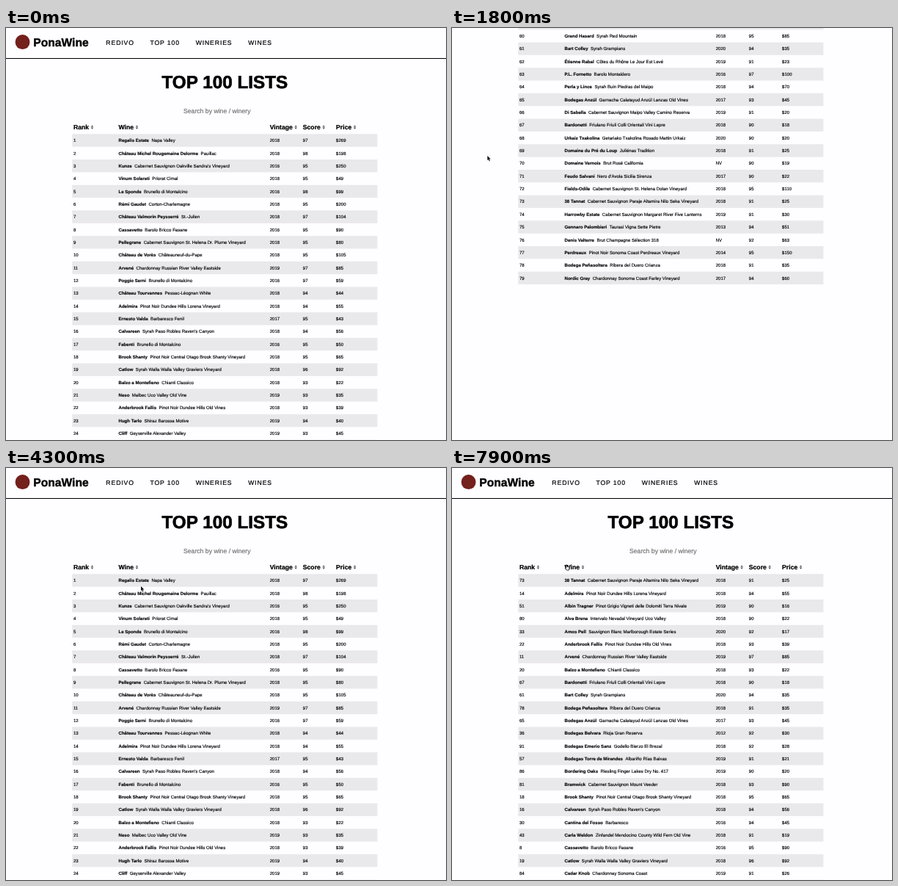
An HTML page with a canvas that plays this animation: 600x561 px, repeating every 8 s.

```html
<!DOCTYPE html>
<html lang="en">
<head>
<meta charset="utf-8">
<title>Top 100 lists</title>
<style>
html, body { margin: 0; width: 100%; height: 100%; overflow: hidden; background: #fefdff; }
canvas { display: block; }
</style>
</head>
<body>
<canvas id="stage" width="600" height="561"></canvas>
<script>
// One wine per line in rank order: winery|wine|vintage|score|price
const wines = `Regalis Estate|Napa Valley|2018|97|269
Château Michel Rougemaine Delorme|Pauillac|2018|98|198
Kunze|Cabernet Sauvignon Oakville Sandra's Vineyard|2016|95|250
Vinum Solarati|Priorat Cimal|2018|95|49
Le Sponde|Brunello di Montalcino|2016|98|99
Rémi Gaudet|Corton-Charlemagne|2018|95|200
Château Valmorin Peysserré|St.-Julien|2018|97|104
Cassavetto|Barolo Bricco Fasane|2016|95|90
Pellegrane|Cabernet Sauvignon St. Helena Dr. Plume Vineyard|2018|95|80
Château de Vorès|Châteauneuf-du-Pape|2018|95|105
Arvené|Chardonnay Russian River Valley Eastside|2019|97|85
Poggio Serni|Brunello di Montalcino|2016|97|59
Château Tourvannes|Pessac-Léognan White|2018|94|44
Adelmira|Pinot Noir Dundee Hills Lorena Vineyard|2018|94|55
Ernesto Valda|Barbaresco Fenil|2017|95|43
Calvareen|Syrah Paso Robles Raven's Canyon|2018|94|56
Fabenti|Brunello di Montalcino|2016|95|50
Brook Shanty|Pinot Noir Central Otago Brook Shanty Vineyard|2018|95|65
Catlow|Syrah Walla Walla Valley Graviers Vineyard|2018|96|92
Balzo a Montefieno|Chianti Classico|2018|93|22
Neso|Malbec Uco Valley Old Vine|2019|93|35
Anderbrook Fallis|Pinot Noir Dundee Hills Old Vines|2018|93|39
Hugh Tarlo|Shiraz Barossa Motive|2019|94|40
Cliff|Geyserville Alexander Valley|2019|93|45
Hoffrath|Riesling Trocken Rheinhessen Westhofener|2019|94|36
Faldetto|Vino Nobile di Montepulciano Riserva|2016|94|36
Morning Tide|Chardonnay Eola-Amity Hills Nine Hollows|2018|93|35
Tenuta Granvello|Bolgheri Rosso|2018|93|32
Domaine Perrolet|Chablis Premier Cru|2018|93|42
Cantina del Fosso|Barbaresco|2016|94|45
Orrin Vale|Pinot Noir Anderson Valley|2018|93|48
Weingut Stollner|Grüner Veltliner Wachau|2019|92|28
Amos Pell|Sauvignon Blanc Marlborough Estate Series|2020|92|17
Quinta da Loureda|Douro Reserva|2017|93|30
Harlan Pike|Zinfandel Dry Creek Valley|2018|92|34
Bodegas Belvara|Rioja Gran Reserva|2012|92|30
Mas Vernet|Bandol Rouge|2017|92|38
Stonelark|Merlot Columbia Valley|2018|92|26
Fattoria Lucenna|Chianti Classico Riserva|2017|92|29
Domaine Aubrelle|Sancerre|2019|91|27
Viña Tesoral|Carmenère Colchagua Valley|2018|91|20
Kettle Ford|Chardonnay Santa Lucia Highlands|2018|92|36
Carla Weldon|Zinfandel Mendocino County Wild Fern Old Vine|2018|91|19
Tenute Riva & Falco|Cannonau di Sardegna Riserva|2018|90|18
Quinta do Serol|Vintage Port|2018|97|100
Rocca di Valdestrina|Chianti Classico San Bertolino Gran Selezione|2016|95|75
Farquell|Cabernet Sauvignon Oakville|2018|98|185
Domaine de Morlaine|Bouzeron|2018|92|42
Pennerlough|Shiraz McLaren Vale Fields Road|2018|95|75
Schloss Wendelberg|Riesling Kamptal Schlosskellerei|2019|91|19
Albin Tragner|Pinot Grigio Vigneti delle Dolomiti Terra Nivale|2019|90|16
Rainsby|Cabernet Sauvignon Napa Valley Cousins Vineyard|2018|95|90
Clos de los Robles|Uco Valley|2018|90|20
Schloss Diemel|Riesling Kabinett Mosel Halder|2019|95|31
Fabrice Monnal|Vin de Savoie|2020|90|14
Guardesi|Amarone della Valpolicella Creta 150|2017|93|60
Bodegas Torre de Mirandes|Albariño Rías Baixas|2019|91|21
Tamanoss|Chardonnay Willamette Valley Inox Unoaked|2020|91|20
Colle del Brè|Custoza Superiore Cà del Lupo|2019|90|22
Grand Hasard|Syrah Red Mountain|2018|95|85
Bart Colley|Syrah Grampians|2020|94|35
Étienne Rabal|Côtes du Rhône Le Jour Est Levé|2019|91|23
P.L. Fornetto|Barolo Montaldero|2016|97|100
Perla y Lince|Syrah Buin Piedras del Maipo|2018|94|70
Bodegas Anzúl|Garnacha Calatayud Anzúl Lanzas Old Vines|2017|93|45
Di Sabella|Cabernet Sauvignon Maipo Valley Camino Reserva|2019|91|20
Bardonetti|Friulano Friuli Colli Orientali Vini Lepre|2018|90|18
Urkaiz Txakolina|Getariako Txakolina Rosado Mattin Urkaiz|2020|90|20
Domaine du Pré du Loup|Juliénas Tradition|2018|91|25
Domaine Vernois|Brut Rosé California|NV|90|19
Feudo Salvani|Nero d'Avola Sicilia Sirenza|2017|90|22
Fields-Odile|Cabernet Sauvignon St. Helena Dolan Vineyard|2018|95|110
38 Tannat|Cabernet Sauvignon Paraje Altamira Nilo Seka Vineyard|2018|91|25
Harrowby Estate|Cabernet Sauvignon Margaret River Five Lanterns|2019|91|30
Gennaro Palombieri|Taurasi Vigna Sette Pietre|2013|94|51
Denis Valterre|Brut Champagne Sélection 318|NV|92|63
Perdreaux|Pinot Noir Sonoma Coast Perdreaux Vineyard|2014|95|150
Bodega Peñasoltera|Ribera del Duero Crianza|2018|91|35
Nordic Gray|Chardonnay Sonoma Coast Farley Vineyard|2017|94|60
Alva Brena|Intervalo Nevadal Vineyard Uco Valley|2018|90|22
Bramwick|Cabernet Sauvignon Mount Veeder|2018|93|90
Rovellina|Extra Dry Conegliano Valdobbiadene Prosecco Superiore RDO~Rive di Soligno|2019|90|28
Martin & Elise Roux|St.-Joseph White|2019|93|65
Cedar Knob|Chardonnay Sonoma Coast|2019|91|26
Henri Besot|Beaune Clos des Agathes Domaine des Fondeurs|2018|93|95
Bordering Oaks|Riesling Finger Lakes Dry No. 417|2019|90|20
Château Grimelle|Côtes de Provence Rosé|2020|91|24
Sayward Coles|Cabernet Sauvignon Calistoga La Danseuse du Matin|2018|96|195
Rui Valadas|Douro Pedra Infinita|2018|91|27
Lumei|Etna|2018|91|33
Bodegas Emerio Sanz|Godello Bierzo El Brezal|2018|92|28
Du Randhof|Chardonnay Robertson Bel Coteau|2020|91|24
Sandro Velucci|Brut Rosé Franciacorta '48|NV|91|36
Château Morsiquet|St.-Emilion|2018|92|65
Fonti di Sarno|Fiano di Avellino|2019|91|28
Kessel|Cabernet Franc Oakville|2018|92|95
Domaine Bellanteau|Saumur White|2018|91|27
Egmot|Cabernet Sauvignon Coombsville The Vow|2018|93|125
Volz|Brut Champagne|2008|99|309
Loder|Cabernet Sauvignon Moon Mountain District Slate Block|2018|94|155`
  .split('\n').map((line, i) => {
    const [name, wine, vintage, score, price] = line.split('|');
    return { rank: i + 1, name, lines: wine.split('~'), vintage, score, price };
  });

const orders = {
  rankUp: wines,
  rankDown: [...wines].reverse(),
  wineUp: [...wines].sort((a, b) => a.name.localeCompare(b.name, 'en'))
};

const LOOP = 8000, STEP = 100;
const ZOOM = 0.4336; // page pixels to stage pixels
const BG = '#fefdff', STRIPE = '#e9e8ea', INK = '#000';
const COL = { rank: 212, wine: 354, vintage: 829.5, score: 933.5, price: 1038 };
const LAST_PAINTED = 79; // rows below this are painted late during the fast scroll

// [time, page offset], held until the next entry
const scrollSteps = [
  [0, 0], [1200, 123], [1300, 170], [1500, 300], [1600, 900], [1700, 1850],
  [1800, 2688], [1900, 3100], [2600, 2960], [2700, 2560], [2800, 2067],
  [2900, 1500], [3000, 900], [3100, 400], [3200, 60], [3300, 0]
];
// [time, x, y] on the stage, linear in between
const pointerPath = [
  [900, 48.3, 174], [2500, 48.3, 174], [2600, 49, 175], [3400, 49, 175],
  [3900, 294, 257], [4100, 294, 257], [4300, 184, 161], [4400, 157, 153],
  [4600, 270, 270], [4700, 270, 270], [5100, 294, 295], [5400, 294, 295],
  [6000, 105, 131.5], [6800, 105, 131.5], [7400, 154, 131.5], [LOOP, 154, 131.5]
];

const ctx = document.getElementById('stage').getContext('2d');

function text(str, x, y, size, { bold = false, color = INK, align = 'left', spacing = 0 } = {}) {
  ctx.font = `${bold ? 'bold ' : ''}${size}px "Liberation Sans", Arial, sans-serif`;
  ctx.textRendering = 'geometricPrecision';
  ctx.letterSpacing = spacing + 'px';
  ctx.textAlign = align;
  ctx.fillStyle = ctx.strokeStyle = color;
  ctx.fillText(str, x, y);
  // A hairline outline gives the heavier look of smoothed screen text
  ctx.lineWidth = size * 0.025;
  ctx.lineJoin = 'round';
  ctx.strokeText(str, x, y);
  return ctx.measureText(str).width;
}

function polygon(points) {
  ctx.beginPath();
  points.forEach(([x, y]) => ctx.lineTo(x, y));
  ctx.closePath();
}

function drawHeader() {
  ctx.fillStyle = '#74201c';
  ctx.beginPath();
  ctx.arc(52, 44, 23, 0, Math.PI * 2);
  ctx.fill();
  text('PonaWine', 86, 57.5, 36, { bold: true });
  [['REDIVO', 314.5], ['TOP 100', 453], ['WINERIES', 596.5], ['WINES', 761.5]]
    .forEach(([label, x]) => text(label, x, 52.5, 20, { spacing: 2 }));
  ctx.fillStyle = INK;
  ctx.fillRect(0, 94.5, 1400, 2.4);
}

function drawColumnTitle(label, x) {
  const left = x + text(label, x, 318.5, 20, { bold: true }) + 6;
  ctx.fillStyle = '#444';
  for (const dir of [-1, 1]) {
    const base = 311.5 + dir * 1.2;
    polygon([[left, base], [left + 8, base], [left + 4, base + dir * 5]]);
    ctx.fill();
  }
}

function drawRow(row, top, height, striped) {
  if (striped) {
    ctx.fillStyle = STRIPE;
    ctx.fillRect(208, top, 960, height);
  }
  const base = top + height / 2 + 5;
  const first = base - (row.lines.length - 1) * 12;
  text(row.rank, COL.rank, base, 14);
  const nameWidth = text(row.name, COL.wine, first, 14, { bold: true });
  text(row.lines[0], COL.wine + nameWidth + 8, first, 14);
  if (row.lines[1]) text(row.lines[1], 420, first + 24, 14);
  text(row.vintage, COL.vintage, base, 14);
  text(row.score, COL.score, base, 14);
  text('$' + row.price, COL.price, base, 14);
}

function drawTable(rows, scroll) {
  let top = 333;
  rows.forEach((row, i) => {
    const height = row.lines.length > 1 ? 58 : 40;
    if (top + height > scroll && top < scroll + 1300) drawRow(row, top, height, i % 2 === 0);
    top += height;
  });
}

function drawArrow(x, y) {
  ctx.save();
  ctx.translate(x, y);
  polygon([[0, 0], [0, 6.2], [1.4, 5], [2.5, 7.4], [3.5, 7], [2.5, 4.6], [4.4, 4.5]]);
  ctx.strokeStyle = '#fff';
  ctx.lineWidth = 0.9;
  ctx.stroke();
  ctx.fillStyle = '#111';
  ctx.fill();
  ctx.restore();
}

function drawHand(x, y) {
  ctx.save();
  ctx.translate(x, y);
  polygon([[1.5, 0.4], [2.5, 0.4], [2.7, 2.7], [5.4, 3.2], [6, 4.2], [5.4, 7.6],
    [2.2, 7.6], [0.2, 4.6], [0.7, 4], [1.6, 4.7]]);
  ctx.fillStyle = '#fff';
  ctx.fill();
  ctx.strokeStyle = '#111';
  ctx.lineWidth = 0.8;
  ctx.stroke();
  ctx.restore();
}

function drawPointer(t) {
  const next = pointerPath.findIndex(key => key[0] > t);
  if (next < 1) return;
  const [t0, x0, y0] = pointerPath[next - 1], [t1, x1, y1] = pointerPath[next];
  const p = (t - t0) / (t1 - t0);
  (t >= 5900 ? drawHand : drawArrow)(x0 + (x1 - x0) * p, y0 + (y1 - y0) * p);
}

function rowsAt(t) {
  if (t >= 7600) return orders.wineUp;
  if (t >= 6300 && t < 6800) return orders.rankDown;
  return t >= 1500 && t < 1900 ? orders.rankUp.slice(0, LAST_PAINTED) : orders.rankUp;
}

function draw(t) {
  const scroll = scrollSteps.findLast(([start]) => start <= t)[1];
  ctx.setTransform(1, 0, 0, 1, 0, 0);
  ctx.fillStyle = BG;
  ctx.fillRect(0, 0, 600, 561);
  ctx.setTransform(ZOOM, 0, 0, ZOOM, 0, -scroll * ZOOM);
  drawHeader();
  text('TOP 100 LISTS', 688, 188.5, 56, { bold: true, align: 'center' });
  text('Search by wine / winery', 558, 267, 20, { color: '#757575' });
  for (const key in COL) drawColumnTitle(key[0].toUpperCase() + key.slice(1), COL[key]);
  drawTable(rowsAt(t), scroll);
  ctx.setTransform(1, 0, 0, 1, 0, 0);
  drawPointer(t);
}

const start = performance.now();
let shown = -1;
function tick() {
  const elapsed = (performance.now() - start) % LOOP;
  const t = Math.floor(elapsed / STEP) * STEP;
  if (t !== shown) draw(shown = t);
  requestAnimationFrame(tick);
}
tick();
</script>
</body>
</html>
```
